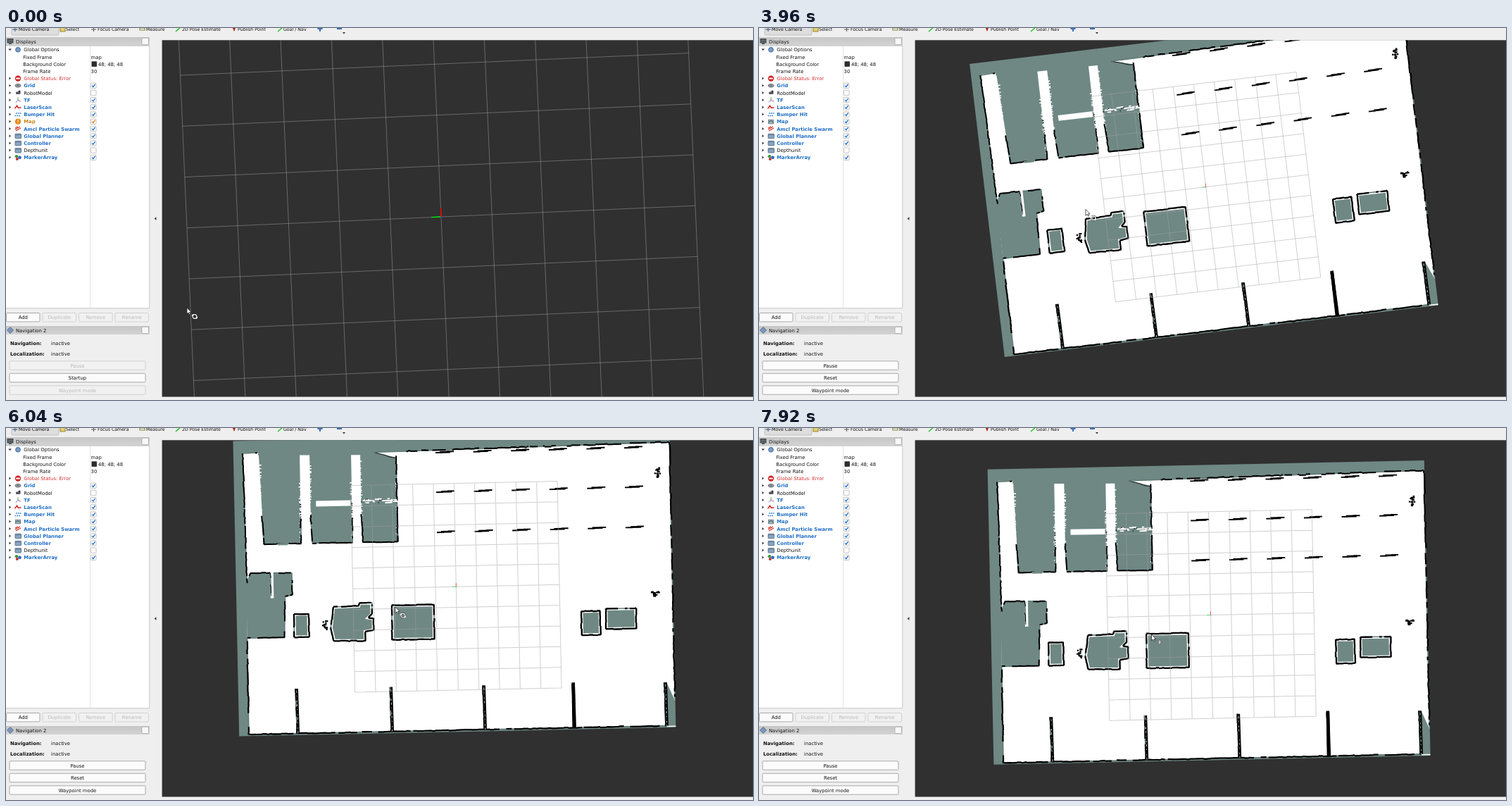
Animation of 1061 by 528 pixels, one loop 8 s. Source, as an HTML page:

```html
<!DOCTYPE html>
<html lang="en">
<head>
<meta charset="utf-8">
<title>Robot map viewer</title>
<style>
  html, body { margin: 0; width: 100%; height: 100%; overflow: hidden; background: #efefef; }
  svg { display: block; width: 100vw; height: 100vh; }
  text { font: 6.83px "DejaVu Sans", sans-serif; text-rendering: geometricPrecision; white-space: pre; }
  #toolbar text { font-size: 6.28px; }
  .bold { font-weight: bold; }
</style>
</head>
<body>
<svg id="stage" viewBox="0 0 1061 528" xmlns="http://www.w3.org/2000/svg">
  <defs>
    <clipPath id="viewClip"><rect x="221.600" y="17.300" width="840" height="506.200"/></clipPath>
    <linearGradient id="bar" x2="0" y2="1"><stop stop-color="#c6c6c6"/><stop offset="1" stop-color="#d3d3d3"/></linearGradient>
  </defs>
  <rect width="1061" height="528" fill="#efefef"/>
  <g id="toolbar"></g>
  <g id="panel"></g>
  <path d="M213.500 268v5l-3-2.500z" fill="#444"/>
  <g clip-path="url(#viewClip)">
    <rect x="221" y="17" width="840" height="507" fill="#303030"/>
    <g id="map"></g>
    <g id="grid"></g>
  </g>
  <g id="cursor">
    <path d="M0 0V8.800L2.100 7L3.500 9.900L4.900 9.300L3.600 6.500H6.200Z" fill="#fff" stroke="#111" stroke-width=".7"/>
    <g id="orbit" fill="none">
      <circle cx="11" cy="12.500" r="2.900" stroke="#222" stroke-width="2.200"/>
      <circle cx="11" cy="12.500" r="2.900" stroke="#fff" stroke-width="1.200"/>
      <path d="M7 11.500l2-2M13 15.500l2-2" stroke="#fff" stroke-width="1.300"/>
    </g>
    <g id="pan">
      <path d="M11.500 7.500v7M8 11h7" stroke="#222" stroke-width="2.200"/>
      <path d="M11.500 7.800v6.400M8.300 11h6.400" stroke="#fff" stroke-width="1.200"/>
    </g>
  </g>
</svg>
<script>
const $ = id => document.getElementById(id);
const LOOP = 8000;
const BLUE = '#1f6fc5', TEAL = '#6f8884';

// ---------- markup helpers ----------
const label = (x, y, s, fill = '#111', bold = false, anchor = 'start') =>
  `<text x="${x}" y="${y}" fill="${fill}" text-anchor="${anchor}"${bold ? ' class="bold"' : ''}>${s}</text>`;
const box = (x, y, w, h, fill, stroke = 'none', rx = 0) =>
  `<rect x="${x}" y="${y}" width="${w}" height="${h}" rx="${rx}" fill="${fill}" stroke="${stroke}" stroke-width=".8"/>`;
const dot = (x, y, r, fill) => `<circle cx="${x}" cy="${y}" r="${r}" fill="${fill}"/>`;
const line = (d, stroke, w = 1, extra = '') =>
  `<path d="${d}" fill="none" stroke="${stroke}" stroke-width="${w}" ${extra}/>`;
const poly = (pts, fill, extra = '') => `<polygon points="${pts}" fill="${fill}" ${extra}/>`;
const button = (x, y, w, s, on) =>
  box(x, y, w, 12.4, on ? '#fbfbfb' : '#f1f1f1', on ? '#979797' : '#c9c9c9', 1.2) +
  label(x + w / 2, y + 8.7, s, on ? '#111' : '#b9b9b9', false, 'middle');

let seed = 41;
const rand = () => (seed = (seed * 16807) % 2147483647) / 2147483647;
const spread = n => (rand() - .5) * 2 * n;
const repeat = (n, f) => Array.from({ length: n }, (_, i) => f(i)).join('');

// ---------- toolbar ----------
$('toolbar').innerHTML =
  box(8, -6, 67, 16, '#dedede', '#b4b4b4', 1.5) +
  line('M13 -2v7M9.500 2h7', '#5b7896', 1.3) +
  box(77, -4, 7, 9, '#e6cf62', '#80702a') +
  line('M121 2h7M124.500 -2v7', '#555') +
  line('M190 0h7v3h-7z', '#8a8a40', 1.2) +
  line('M241 5l7-6M386 5l7-6', '#19c819', 1.4) +
  poly('321,-2 327,-2 324,5', '#b52b1e') +
  line('M446 -2v7M442.500 1h7M470 1h7', '#3c6eb4', 2) +
  poly('478,6 482,6 480,8.500', '#333') +
  label(18, 4.4, 'Move Camera') + label(85, 4.4, 'Select') + label(130, 4.4, 'Focus Camera') +
  label(199, 4.4, 'Measure') + label(250, 4.4, '2D Pose Estimate') +
  label(329, 4.4, 'Publish Point') + label(394, 4.4, 'Goal / Nav');

// ---------- left panel ----------
const icons = {
  gear: y => dot(17, y, 3.8, '#5d83b3') + dot(17, y, 1.8, '#c9d9ec') + line(`M13 ${y}h8M17 ${y - 4}v8`, '#5d83b3', .8),
  error: y => dot(17, y, 4.2, '#d41f1f') + box(14.2, y - 1, 5.6, 2, '#fff'),
  grid: y => `<ellipse cx="17" cy="${y}" rx="4" ry="2.300" fill="#b9bcc4" stroke="#4b4d55" stroke-width=".8"/>` + line(`M14 ${y}h6M17 ${y - 2}v4`, '#4b4d55', .7),
  robot: y => box(14, y - 1.5, 6.5, 3.5, '#555b62', 'none', 1) + dot(19, y - 2, 1.6, '#3a3e44'),
  tf: y => line(`M17 ${y}v-4`, '#46a546') + line(`M17 ${y}l-3 3.500`, '#5a70c8') + line(`M17 ${y}l4 2`, '#b0607c'),
  laser: y => line(`M12.500 ${y + 2}l3-4 2 3 4-.5`, '#d81b1b', 1.5),
  bumper: y => repeat(6, i => dot(13.5 + i * 1.4, y + (i % 2 ? -1.5 : 2), 1, '#3b8ad6')),
  map: y => `<g id="mapWarn">${dot(17, y, 4.1, '#e28a12')}${box(16.5, y - 2.6, 1, 3.2, '#fff')}${dot(17, y + 2, .6, '#fff')}</g>` +
    `<g id="mapOk">${box(13.5, y - 2.5, 7, 5.5, '#9fb3be', '#59707e')}${line(`M13.500 ${y + 1}l3-2 4 2`, '#38505e')}</g>`,
  swarm: y => line(`M13 ${y + 1}l7-4M14 ${y + 3}l7-4M13 ${y - 1}l4-2`, '#d22a20', 1.2),
  folder: y => box(13, y - 3, 8.5, 6.5, '#8aa5c0', '#4c6680', .8) + line(`M13 ${y - 1.5}h8`, '#4c6680', .7),
  marker: y => dot(15, y - 1.5, 2.3, '#38a038') + dot(19.5, y, 2.4, '#3565c4') + dot(15.8, y + 2.2, 2, '#c83030')
};
const rows = [
  ['Global Options', 'gear'], ['Fixed Frame', '', 'map'], ['Background Color', '', '48; 48; 48'], ['Frame Rate', '', '30'],
  ['Global Status: Error', 'error'], ['Grid', 'grid', true], ['RobotModel', 'robot', false], ['TF', 'tf', true],
  ['LaserScan', 'laser', true], ['Bumper Hit', 'bumper', true], ['Map', 'map', true], ['Amcl Particle Swarm', 'swarm', true],
  ['Global Planner', 'folder', true], ['Controller', 'folder', true], ['Depthunit', 'folder', false], ['MarkerArray', 'marker', true]
];
function treeRow([name, icon, value], i) {
  const y = 30.8 + 10.2 * i, base = y + 2.5;
  const color = icon === 'error' ? '#d02b2b' : value === true ? BLUE : '#111';
  let out = label(icon ? 25.3 : 24.3, base, name, color, value === true);
  if (icon) {
    out += icons[icon](y) +
      `<path d="${i ? `M4.500 ${y - 2}v4l2.600-2z` : `M3.500 ${y - 1.2}h4.400l-2.200 2.600z`}" fill="#333"/>`;
  }
  if (typeof value === 'boolean') {
    out += box(120.6, y - 3.7, 7.4, 7.4, '#fff', '#b5b5b5', .8);
    if (value) out += line(`M122.200 ${y}l1.600 1.800 2.800-4`, BLUE, 1.3, 'class="tick"');
  } else if (value) {
    const swatch = name === 'Background Color';
    if (swatch) out += box(122, y - 3.3, 6.4, 6.4, '#303030', '#111');
    out += label(swatch ? 131 : 120.6, base, value);
  }
  return `<g id="row-${name}">${out}</g>`;
}
const titleBar = (y, s) => box(0, y, 204, 12, 'url(#bar)') + label(14, y + 8.6, s) + box(193, y + 1.2, 9.4, 9.4, '#f8f8f8', '#a9a9a9', .8);
const navButtons = (names, isOn) => names.map((s, i) => button(5, 472.8 + 17.5 * i, 193, s, isOn(s))).join('');
const status = (y, s) => label(6, y, s, '#111', true) + label(64, y, 'inactive');

$('panel').innerHTML =
  titleBar(13, 'Displays') + box(2, 15.5, 8, 5.5, '#59636b', '#333') + box(4, 21.5, 4, 1.5, '#444') +
  box(-1, 25.2, 204.8, 372.6, '#fff', '#bdbdbd') + line('M119.500 25.500V397.500', '#dedede', .8) +
  rows.map(treeRow).join('') +
  ['Add', 'Duplicate', 'Remove', 'Rename'].map((s, i) => button(.5 + 51.5 * i, 404.5, 47.5, s, !i)).join('') +
  titleBar(423, 'Navigation 2') + poly('6,424.500 10.500,429 6,433.500 1.500,429', '#7c97bd', 'stroke="#3f5a82" stroke-width=".8"') +
  status(450, 'Navigation:') + status(465.2, 'Localization:') +
  `<g id="idle">${navButtons(['Pause', 'Startup', 'Waypoint mode'], s => s === 'Startup')}</g>` +
  `<g id="running">${navButtons(['Pause', 'Reset', 'Waypoint mode'], () => true)}</g>`;

// ---------- map ----------
const parse = s => s.split(' ').map(p => p.split(',').map(Number));
const rectPts = (x, y, w, h) => `${x},${y} ${x + w},${y} ${x + w},${y + h} ${x},${y + h}`;

// Broken black strokes that wander along a polyline, like scanned walls.
function wall(s, width = 2.2, gap = .15, jitter = .6) {
  const pts = parse(s);
  let d = '';
  for (let i = 1; i < pts.length; i++) {
    const [x0, y0] = pts[i - 1], [x1, y1] = pts[i];
    const len = Math.hypot(x1 - x0, y1 - y0), ux = (x1 - x0) / len, uy = (y1 - y0) / len;
    for (let at = 0; at < len;) {
      const run = Math.min(2 + rand() * 8, len - at), off = spread(jitter);
      if (rand() > gap) d += `M${x0 + ux * at - uy * off} ${y0 + uy * at + ux * off}l${ux * run} ${uy * run}`;
      at += run;
    }
  }
  return `<polyline points="${s}" fill="none" stroke="#627c76" stroke-width="1.600"/>` + line(d, '#000', width);
}
function block(s) {
  return poly(s, TEAL, 'stroke="#fff" stroke-width="5"') + wall(`${s} ${s.split(' ')[0]}`, 2.3, .08, .5);
}
function ragged(x, y0, y1, color, reach) {
  let d = '';
  for (let y = y0; y < y1; y += 1.5 + rand() * 4) {
    const r = reach * rand();
    d += `M${x - r} ${y}h${2 * r}`;
  }
  return line(d, color, 1.5);
}
// Unscanned room: frayed sides, with a wall around its lower end.
function room(x, w, slant = 0) {
  const right = x + w;
  return poly(`${x - slant},14 ${right},14 ${right},160 ${x + 2},160 ${x},110`, TEAL) +
    ragged(x - slant / 2, 45, 145, '#fff', 2.5) + ragged(right, 75, 155, '#fff', 2.5) +
    ragged(right, 105, 155, '#111', 1) +
    wall(`${x},120 ${x + 2},160 ${right},160 ${right},125`, 2, .12, .5);
}
function bay(x) {
  const foot = 430 - (x - 411) / 210;
  return line(`M${x} 366L${x + 1} ${foot}`, '#000', 4.4) +
    line(`M${x} 369L${x + 1} ${foot}`, '#b9c4c1', 1, 'stroke-dasharray="3 4 1 6 2 3"') +
    wall(`${x - 1.5},366 ${x - .5},${foot}`, 1.6, .2);
}
function shelf(x, y) {
  return line(`M${x} ${y + .7}h10M${x + 16} ${y - .7}h10`, '#000', 1.9) +
    line(`M${x + 5 + rand() * 3} ${y}h15`, '#000', 2.8);
}
function clutter(x, y, w, h, n) {
  return line(repeat(n, () => `M${x + rand() * w} ${y + rand() * h}h${2 + rand() * 2}`), '#000', 2.2);
}

const annex = '342,215 346,205 348,201 376,201 380,201 407,202 407,233 397,235 395,293 342,293';
const workCell = '465,251 501,250 502,246 520,246 520,262 515,267 522,268 522,285 510,287 510,300 465,299 461,280';

$('map').innerHTML =
  poly('326.700,13.100 947,10.900 948.600,430 328.300,432.200', TEAL) +
  poly('341,30 362,30 362,34 507,36 527,33 946,25 948,392 937,367 936,427 342,430 342,293 343,215', '#fff') +
  line('M936 428.500H948.500', '#fff', 1.6) +
  room(366, 55, 4) + poly('387,159 402,159 402,162 388,162', TEAL) + room(435, 59) + room(507, 51) +
  poly('527,32.500 558,32 558,41', '#fff') + wall('527,33 557,41', .8) + wall('558,38 558,160', 2, .12, .5) +
  box(443, 100, 49, 8, '#fff') + box(507, 98, 50, 7, TEAL) +
  line(repeat(24, () => `M${507 + rand() * 48} ${98.5 + rand() * 6}h${3 + rand() * 7}`), '#fff', 1.8) +
  line(repeat(8, () => `M${507 + rand() * 48} ${98.5 + rand() * 6}h1.500`), '#111', 1.2) +
  poly(annex, TEAL) + wall(annex.slice(annex.indexOf('346')), 2, .12, .5) +
  line('M378.500 199V237', '#fff', 4.5) + wall('376.500,201 377,234', 1, .4) +
  wall('361,30 340,31 343,215', 2) + wall('342,293 342,430 936,427.500') +
  wall('527,32.500 946,25', 2, .25, .8) + wall('946.500,25 948,390') +
  [411, 545, 677, 804, 935].map(bay).join('') + line('M804 364V428', '#000', 4.6) +
  block(rectPts(409, 260, 21, 33)) + block(workCell) + block(rectPts(548, 250, 60, 49)) +
  block(rectPts(817, 263, 27, 34)) + block(rectPts(852, 260, 43, 29)) +
  repeat(6, i => [33.8, 90, 147].map(y => shelf(614 + 53.6 * i, y - .45 * i)).join('')) +
  clutter(448, 270, 7, 15, 12) + clutter(924, 61, 8, 14, 16) + clutter(916, 237, 10, 3, 9) + clutter(919, 241, 4, 3, 5);

// ---------- grid, in cells of one unit ----------
$('grid').innerHTML =
  line(repeat(11, i => `M${i - 5} -5V5M-5 ${i - 5}H5`), '#a0a0a4', 1, 'stroke-opacity=".5" vector-effect="non-scaling-stroke"') +
  line('M0 0H-.19', '#0e0', .02) + line('M0 0V-.18', '#f00', .02) + line('M0 0v.02', '#22f', .02);

// ---------- timeline ----------
const MAP_SHOWN = 3360, STARTED = 960, PAN_BEGIN = 7560, PAN_END = 7920;
const redraws = [MAP_SHOWN, 3640, 3960, 4360, 4680, 5000, 5280, 5640, 6040, 6440, 6840, 7160, PAN_BEGIN, PAN_END];
const angleKeys = [[3360, -8.8], [3640, -9.55], [3960, -6.8], [4360, -.2], [4680, 3.8], [5280, -.6], [5640, -.6], [6040, -1.18], [6440, -.5], [7160, -1.18]];
const pointerKeys = [[3360, 450, 304], [4360, 471.5, 232], [5000, 469, 245], [5280, 467.5, 225], [5640, 553, 251], [6840, 552.5, 262], [7160, 552.5, 262], [7560, 556, 251.5], [7920, 557.5, 293]];

const mix = (a, b, p) => a + (b - a) * p;
const smooth = p => p * p * (3 - 2 * p);
const stepped = (t, from, n) => t < from ? 0 : Math.min(1, (Math.floor((t - from) / 40) + 1) / n);

// Eased values between timed keys.
function track(t, keys) {
  const next = keys.findIndex(k => k[0] > t);
  if (next < 0) return keys[keys.length - 1].slice(1);
  const a = keys[next - 1], b = keys[next];
  const p = smooth((t - a[0]) / (b[0] - a[0]));
  return a.slice(1).map((v, i) => mix(v, b[i + 1], p));
}
function emptyView(t) {
  const [x0, y0, x1, y1, p] = t < STARTED
    ? [257, 397, 170, 498, smooth(stepped(t, 240, 10))]
    : [170, 498, 419, 376, smooth(stepped(t, STARTED, 7))];
  const nudge = t >= 760 && t < STARTED ? .5 : 0;
  return { angle: -2.5, x: 618, y: 268, cell: 72.27, pointer: [mix(x0, x1, p) + nudge, mix(y0, y1, p)] };
}
function mapView(t) {
  const at = redraws.filter(s => s <= t).pop();
  const [angle] = track(at, angleKeys);
  const panned = at >= PAN_END;
  return {
    angle, cell: 29.35, pointer: track(at, pointerKeys),
    x: 640.3 + .82 * angle + (panned ? 2.2 : 0),
    y: 225.2 - .06 * angle + (panned ? 40.3 : 0)
  };
}
const show = (id, on) => $(id).setAttribute('display', on ? 'inline' : 'none');
const mapName = $('row-Map').querySelector('text'), mapTick = $('row-Map').querySelector('.tick');

function draw(t) {
  const loaded = t >= MAP_SHOWN;
  const { angle, x, y, cell, pointer } = loaded ? mapView(t) : emptyView(t);
  show('map', loaded);
  show('mapOk', loaded);
  show('mapWarn', !loaded);
  mapName.setAttribute('fill', loaded ? BLUE : '#c5861a');
  mapTick.setAttribute('stroke', loaded ? BLUE : '#d98a1c');
  show('idle', t < STARTED);
  show('running', t >= STARTED);
  $('map').setAttribute('transform', `translate(${x} ${y}) rotate(${angle + .2}) translate(-640 -225.2)`);
  $('grid').setAttribute('transform', `translate(${x} ${y}) rotate(${angle}) scale(${cell})`);
  $('cursor').setAttribute('transform', `translate(${pointer})`);
  show('orbit', pointer[0] > 222 && t < PAN_BEGIN);
  show('pan', t >= PAN_BEGIN);
}

const start = performance.now();
function tick() {
  draw((performance.now() - start) % LOOP);
  requestAnimationFrame(tick);
}
tick();
</script>
</body>
</html>
```
